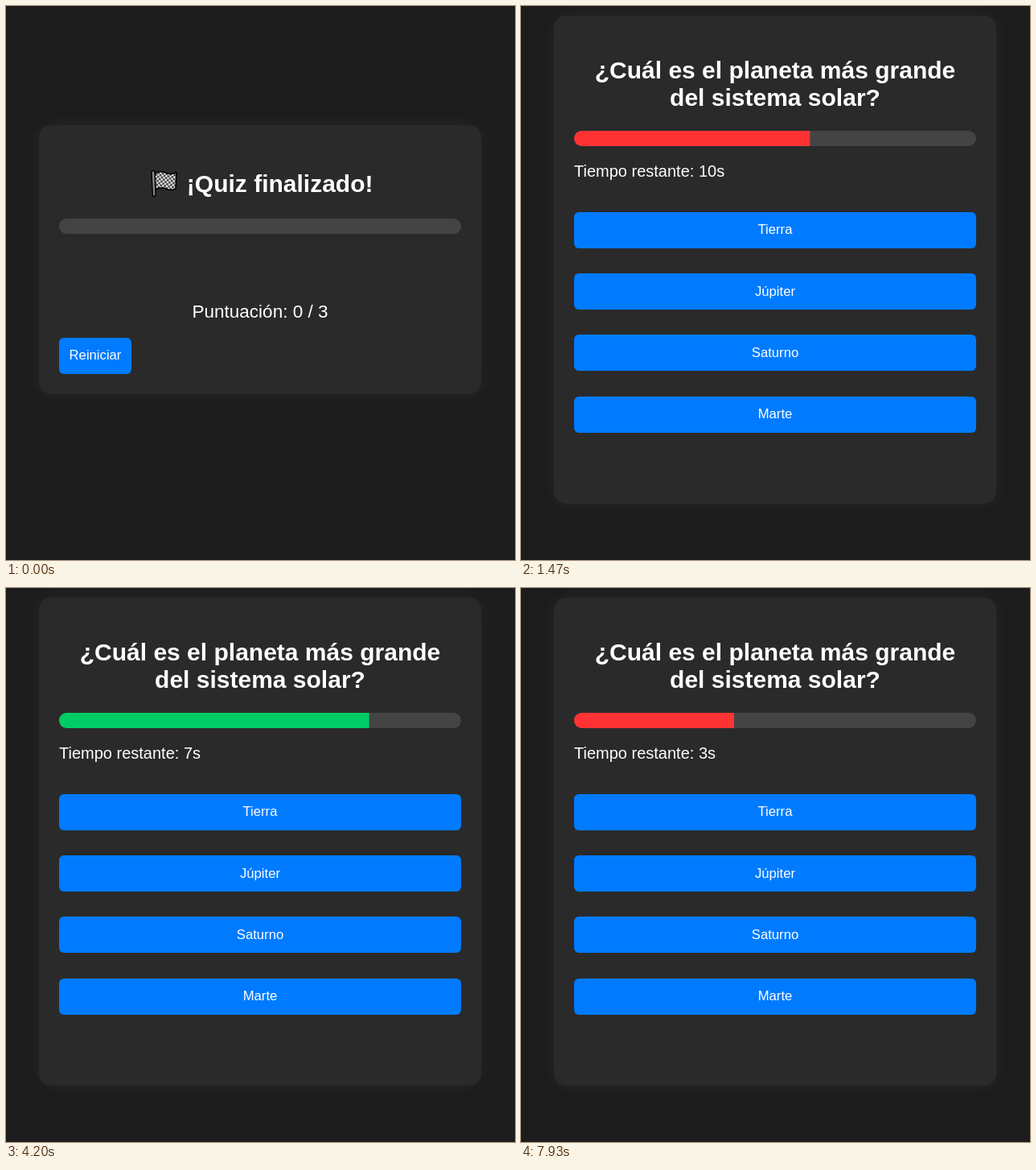
These frames come from a looping animation (633 by 688 pixels, 8 s). An HTML page:

```html
<!DOCTYPE html>
<html lang="es">
<head>
<meta charset="utf-8">
<title>Quiz</title>
<style>
  html, body { margin: 0; width: 100%; height: 100%; overflow: hidden; background: #1c1c1c; }
  #card {
    position: absolute; left: 41px; width: 550px; border-radius: 15px;
    background: #2a2a2a; box-shadow: 0 0 25px rgba(255, 255, 255, .05);
  }
  svg { position: absolute; left: 0; top: 0; }
  text { font-family: "Liberation Sans", Arial, sans-serif; fill: #fff; text-anchor: middle; }
  .title { font-size: 30px; font-weight: bold; }
  .label { font-size: 16.667px; }
  .button { fill: #007bff; }
  .button.hover { fill: #0056b3; }
  .track { fill: #444; }
  .pointer { fill: #c000ff; stroke: #000; stroke-width: 1.4; stroke-linejoin: round; }
</style>
</head>
<body>
<div id="card"></div>
<svg width="633" height="688" viewBox="0 0 633 688">
  <defs>
    <clipPath id="trackClip"><rect x="66" y="155" width="500" height="19" rx="9.4"/></clipPath>
    <pattern id="checks" width="5" height="5" patternUnits="userSpaceOnUse" patternTransform="translate(186 208) rotate(8)">
      <rect width="5" height="5" fill="#f2f2f2"/>
      <path d="M0 0h2.5v2.5H0zM2.5 2.5H5V5H2.5z" fill="#333"/>
    </pattern>
  </defs>

  <g id="endView">
    <path d="M185 208Q192 204 198 207T212 207L211 227Q205 230 199 227T186 228Z" fill="url(#checks)" stroke="#000" stroke-width="1.6"/>
    <path d="M181 206Q183 203 185 206L186 236H182.500Z" fill="#8a8a8a" stroke="#000" stroke-width="1.4"/>
    <text class="title" x="456.500" y="231" style="text-anchor:end">¡Quiz finalizado!</text>
    <rect class="track" x="66" y="264" width="500" height="19" rx="9.4"/>
    <text x="316" y="387" font-size="22.5">Puntuación: 0 / 3</text>
    <rect id="restart" class="button" x="66" y="412" width="90" height="45" rx="6"/>
    <text class="label" x="111" y="439">Reiniciar</text>
  </g>

  <g id="quizView">
    <text class="title" x="316" y="90">¿Cuál es el planeta más grande</text>
    <text class="title" x="316" y="124">del sistema solar?</text>
    <rect class="track" x="66" y="155" width="500" height="19" rx="9.4"/>
    <g clip-path="url(#trackClip)"><rect id="fill" x="66" y="155" height="19"/></g>
    <text id="timer" x="66" y="212" font-size="20" style="text-anchor:start"></text>
    <g id="answers"></g>
  </g>

  <g id="cursor">
    <path id="arrow" class="pointer" d="M0 0V20L5 16L8.500 24L12 22.500L8.500 15H15Z"/>
    <g id="hand">
      <path class="pointer" d="M-2.500 1.500Q-.5 -1.500 1.500 1.500V7Q4 4.500 5.500 7.500Q7.500 5.500 8.500 8.500Q11 7 11 10.500V17Q10.500 21 8 24.500Q3 27 -2 24.500L-8.500 16Q-9.500 12.500 -6 13.500L-2.500 16Z"/>
      <path d="M1.500 6V12M5.500 7V12M8.500 8V12" fill="none" stroke="#000" stroke-width="1.3"/>
    </g>
  </g>
</svg>
<script>
const LOOP = 8000, STEP = 1000 / 15;
const QUIZ_START = 880, FIRST_TICK = 1913;
const CURSOR_IN = 265, CURSOR_REST = 667, CURSOR_OUT = 1130;
const FROM = [433, 575], TO = [120, 452];

const el = id => document.getElementById(id);
const show = (id, on) => { el(id).style.display = on ? "" : "none"; };
const clamp = (v, lo, hi) => Math.min(hi, Math.max(lo, v));

const answers = [["Tierra", 256, 283], ["Júpiter", 332, 360], ["Saturno", 408, 436], ["Marte", 485, 512]];
el("answers").innerHTML = answers.map(([name, top, baseline]) =>
  `<rect class="button" x="66" y="${top}" width="500" height="45" rx="6"/>
   <text class="label" x="316" y="${baseline}">${name}</text>`).join("");
const buttons = document.querySelectorAll(".button");

function isInside(rect, x, y) {
  const get = name => +rect.getAttribute(name);
  return x >= get("x") && x <= get("x") + get("width") && y >= get("y") && y <= get("y") + get("height");
}

function barColor(seconds) {
  if (seconds === 10) return "#ff3333";
  return seconds > 6 ? "#00cc66" : seconds > 3 ? "#ffcc00" : "#ff3333";
}

function drawQuiz(t) {
  const seconds = t < FIRST_TICK ? 10 : 9 - Math.floor((t - FIRST_TICK) / 1000);
  const width = Math.min((t - QUIZ_START) / 2, 500 - (t - FIRST_TICK) / 20);
  el("fill").setAttribute("width", clamp(width, 0, 500));
  el("fill").setAttribute("fill", barColor(seconds));
  el("timer").textContent = `Tiempo restante: ${seconds}s`;
}

function drawCursor(t, inQuiz) {
  const visible = t >= CURSOR_IN && t < CURSOR_OUT;
  const p = clamp((t - CURSOR_IN) / (CURSOR_REST - CURSOR_IN), 0, 1);
  const eased = 1 - (1 - p) ** 2;
  const [x, y] = FROM.map((v, i) => v + (TO[i] - v) * eased);
  let hovering = false;
  for (const button of buttons) {
    const active = (button.id === "restart") !== inQuiz;
    const hover = visible && active && isInside(button, x, y);
    button.classList.toggle("hover", hover);
    hovering = hovering || hover;
  }
  show("cursor", visible);
  show("hand", hovering);
  show("arrow", !hovering);
  el("cursor").setAttribute("transform", `translate(${x} ${y})`);
}

function render(time) {
  const t = Math.min(119, Math.floor((time + 4) / STEP)) * STEP;
  const inQuiz = t >= QUIZ_START;
  show("endView", !inQuiz);
  show("quizView", inQuiz);
  el("card").style.top = inQuiz ? "12px" : "148px";
  el("card").style.height = inQuiz ? "606px" : "334px";
  if (inQuiz) drawQuiz(t);
  drawCursor(t, inQuiz);
}

const start = performance.now();
function loop() {
  render((performance.now() - start) % LOOP);
  requestAnimationFrame(loop);
}
loop();
</script>
</body>
</html>
```
